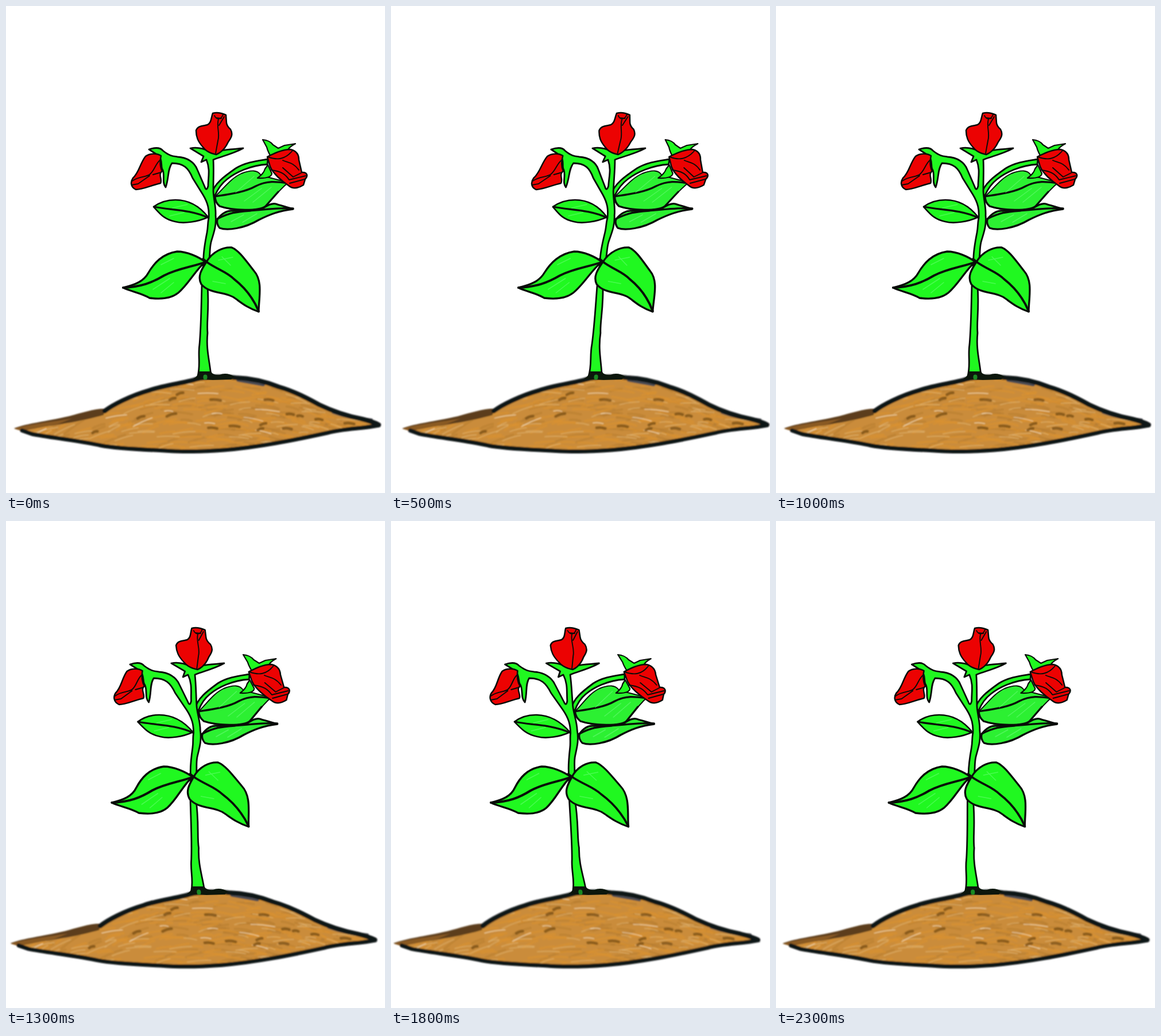
Animation, 660 px wide and 849 px high, one loop 2.4 s. Source, as an HTML page:

```html
<!DOCTYPE html>
<html lang="en">
<head>
<meta charset="utf-8">
<title>Swaying rose</title>
<style>
  html, body { margin: 0; width: 100%; height: 100%; overflow: hidden; background: #fff; }
  svg { display: block; }
  path { stroke-linecap: round; stroke-linejoin: round; }
  .green, .red, .line { stroke: #080c08; stroke-width: 3.3; fill: none; }
  .green { fill: #20f820; }
  .dull { fill: #2cf032; }
  .red { fill: #ec0202; stroke-width: 2.5; }
  .thin { stroke-width: 1.9; }
  .bold { stroke-width: 3.8; }
  .ink { fill: none; stroke: #101214; stroke-width: 8; }
  .gray { fill: none; stroke: #4a4c52; stroke-width: 6; }
  .shine { fill: none; stroke: #8f9; stroke-width: 1.5; opacity: .4; }
  #grain path { fill: none; }
</style>
</head>
<body>
<svg width="660" height="849" viewBox="0 0 660 849">
  <defs>
    <path id="soil" d="M16,736 C60,726 120,718 170,706 C220,676 270,657 340,649 C380,643 440,648 480,665 C530,682 560,705 610,715 L650,730 C600,736 560,742 520,751 C440,768 380,777 280,776 C200,772 120,762 45,746 Z"/>
    <clipPath id="inSoil"><use href="#soil"/></clipPath>
    <filter id="soft"><feGaussianBlur stdDeviation="1"/></filter>
  </defs>
  <g id="plant">
    <g filter="url(#soft)">
      <use href="#soil" fill="#ca8c3a"/>
      <g id="grain" clip-path="url(#inSoil)"></g>
      <path fill="#5c3e1e" d="M14,736 C40,727 65,725 110,715 C130,710 152,702 172,702 L170,713 C140,722 90,731 50,735 L28,740 Z"/>
      <path fill="#8a5a24" d="M14,737 C40,729 70,727 115,719 L90,729 L28,741 Z"/>
      <path class="gray" d="M404,652 L448,660 M570,708 Q600,719 636,722"/>
      <path class="ink" d="M172,706 C185,696 215,680 250,670 C275,661 312,657 330,651 C350,645 385,646 400,648 C430,649 455,656 475,664 C500,671 522,682 545,695 C570,707 600,716 620,720 Q640,725 649,730"/>
      <path class="ink" style="stroke-width:7" d="M649,731 C620,737 590,736 560,744 C500,757 440,769 380,774 C340,777 300,777 275,775 C230,773 190,771 165,766 C130,758 75,752 45,746 L28,740"/>
    </g>

    <path class="green dull" d="M368,372 C375,362 385,356 395,357 L445,354 C455,348 463,343 470,345 C485,350 495,352 500,354 C475,357 458,364 440,373 C415,388 385,392 372,387 Q366,380 368,372 Z"/>
    <path class="line" d="M368,371 C390,360 400,359 425,357 C445,355 480,351 500,353"/>
    <path class="green dull thin" d="M364,332 C380,317 392,300 410,292 C428,285 438,286 444,295 C460,300 480,304 491,308 C475,322 462,338 452,349 C440,358 395,357 372,349 Q363,343 364,332 Z"/>
    <path class="line" d="M474,324 L452,349 C440,358 395,357 372,349 Q364,342 364,332 C390,328 415,325 435,314 C455,304 470,306 491,309"/>
    <path class="shine" d="M400,325 L432,297 M415,340 L445,318 M430,342 L462,316 M392,376 L414,364 M412,377 L437,362"/>

    <path class="green" style="stroke-width:2.8" d="M358,328 C362,310 380,297 400,283 C418,272 438,270 456,267 L455,276 C425,278 400,290 385,302 Q372,312 364,330 Z"/>
    <path class="green" style="stroke-width:2.2" d="M447,233 Q459,234 465,242 L474,248 L485,243 L504,240 Q492,246 489,254 L462,264 Q456,254 454,246 Z"/>
    <path class="green" style="stroke-width:2.2" d="M456,277 L463,292 Q462,301 438,300 Q449,292 451,284 Z"/>

    <path class="green" style="stroke-width:2.8" d="M334,645 C339,625 334,610 337,590 C340,555 340,520 341,488 L344,446 C343,430 347,410 350,395 C352,385 351,378 353,370 C354,355 352,344 343,329 L325,300 C318,283 310,274 289,274 C281,285 284,300 278,316 C271,308 277,296 273,286 C268,280 275,268 263,259 L249,250 C258,247 268,246 273,252 C285,262 292,262 299,263 C315,264 328,272 333,285 L346,315 Q349,324 352,314 C352,298 356,285 349,268 L340,272 L344,262 L321,248 C335,245 350,250 358,256 C372,250 395,250 413,248 C395,258 375,262 361,268 C362,285 361,300 361,322 C361,335 366,350 365,365 C367,385 360,400 357,412 C354,425 356,435 353,445 L351,488 C354,530 349,550 351,570 C348,600 355,620 357,645 Z"/>
    <path fill="#0c160c" d="M326,650 Q336,644 335,637 L357,637 Q360,644 372,643 Q384,638 398,646 L392,651 L360,652 Z"/>
    <path fill="none" stroke="#1a8a22" stroke-width="7" d="M347,646 v2"/>

    <path class="green" style="stroke-width:2.6" d="M257,350 C268,342 280,338 295,338 C320,338 338,350 352,368 C335,376 310,380 295,376 C275,372 268,362 257,350 Z"/>
    <path class="line" d="M258,350 C285,356 320,354 352,369"/>
    <path class="green" d="M204,491 C225,486 240,480 248,465 C258,448 272,432 298,428 C315,428 335,437 347,446 C330,460 318,485 300,500 C285,512 265,511 250,509 C235,500 218,498 204,491 Z"/>
    <path class="line bold" d="M204,491 C235,490 255,482 275,470 C300,457 325,455 348,446"/>
    <path class="green" d="M349,446 C360,428 378,420 393,421 C405,426 415,440 432,462 C448,480 440,510 440,533 C422,527 412,519 401,511 C384,497 355,503 340,485 C333,472 340,460 349,446 Z"/>
    <path class="line bold" d="M343,441 L352,448 C370,460 385,464 397,476 C415,490 430,508 440,532"/>
    <path class="shine" d="M290,352 L316,346 M285,366 L310,360 M270,451 L292,440 M256,494 L285,475 M270,500 L292,482 M370,443 L395,438 M360,480 L382,484 M376,437 L391,452"/>

    <path class="red" d="M360,187 Q370,184 383,190 L384,204 Q385,210 391,215 C396,224 392,230 387,237 C382,248 376,255 366,259 C356,257 348,253 343,246 C334,236 331,228 331,217 C334,208 345,209 351,207 C358,203 357,195 360,187 Z"/>
    <path class="line thin" d="M378,189 C374,200 366,198 363,191 M366,195 L375,196 M370,197 C366,210 373,222 369,235 L365,257 M371,208 L380,193"/>

    <path class="red" d="M243,262 C250,257 262,256 270,261 C268,270 268,280 272,288 C264,293 273,303 269,309 C252,313 238,320 226,320 C216,315 217,306 221,300 C232,290 233,275 243,262 Z"/>
    <path class="line thin" d="M220,305 C232,296 245,299 251,293 C259,286 260,275 269,268 M219,312 L230,310 L250,296 M256,294 L270,290"/>

    <path class="red" d="M455,263 C465,258 480,250 495,250 C505,252 510,258 510,268 L515,290 C524,289 527,296 521,302 L518,312 C510,317 500,320 492,313 C480,305 465,292 460,280 Z"/>
    <path class="line thin" d="M456,263 C472,269 486,268 499,252 M482,269 C490,273 500,272 510,286 M462,286 C480,288 487,294 493,303 L522,296 M482,282 L500,298 L514,291 M494,309 L520,302"/>
  </g>
</svg>
<script>
const plant = document.getElementById('plant');
const grain = document.getElementById('grain');

let seed = 7;
const rand = () => (seed = seed * 16807 % 2147483647) / 2147483647;

function stroke(x, y, len, angle, color, width, opacity) {
  const p = document.createElementNS('http://www.w3.org/2000/svg', 'path');
  const dx = len * Math.cos(angle), dy = len * Math.sin(angle);
  p.setAttribute('d', `M${x - dx / 2},${y - dy / 2} q${dx / 2},${dy / 2 - 2} ${dx},${dy}`);
  p.setAttribute('stroke', color);
  p.setAttribute('stroke-width', width);
  p.setAttribute('opacity', opacity);
  grain.append(p);
}

// Brushed soil: slanted strokes on the left, flatter and falling on the right.
function brush(count, color, width, opacity) {
  for (let i = 0; i < count; i++) {
    const x = 40 + rand() * 600, y = 650 + rand() * 122;
    stroke(x, y, 14 + rand() * 30, (x - 390) / 700 + (rand() - .5) * .5, color, width, opacity);
  }
}
brush(150, '#b07830', 4, .4);
brush(170, '#da9230', 4, .55);
brush(100, '#e2b878', 2, .55);
brush(24, '#fff0d5', 1.5, .65);

const clods = [290, 685, 365, 687, 458, 687, 235, 717, 288, 713, 360, 736, 398, 733, 443, 738,
  448, 729, 495, 712, 545, 721, 512, 715, 598, 728, 303, 676, 155, 743, 490, 737];
for (let i = 0; i < clods.length; i += 2) {
  const x = clods[i];
  stroke(x, clods[i + 1], 9 + rand() * 9, x < 320 || x > 420 && x < 450 ? -.3 : .08, '#7d5218', 5, .8);
}

// Sideways offset at the top bud: a short swing right, then a longer one left.
const arc = (t, start, end) => 1 - Math.abs((2 * t - start - end) / (end - start)) ** 1.8;
const sway = t => t < 1000 ? 33 * arc(t, 0, 1000) : -57.6 * arc(t, 1000, 2400);

const STEP = 100, LOOP = 2400, GROUND = 849, REACH = 663;
function draw() {
  const t = Math.floor(performance.now() % LOOP / STEP) * STEP;
  const k = sway(t) / REACH;
  plant.setAttribute('transform', `matrix(1 0 ${-k} 1 ${k * GROUND} 0)`);
  requestAnimationFrame(draw);
}
draw();
</script>
</body>
</html>
```
